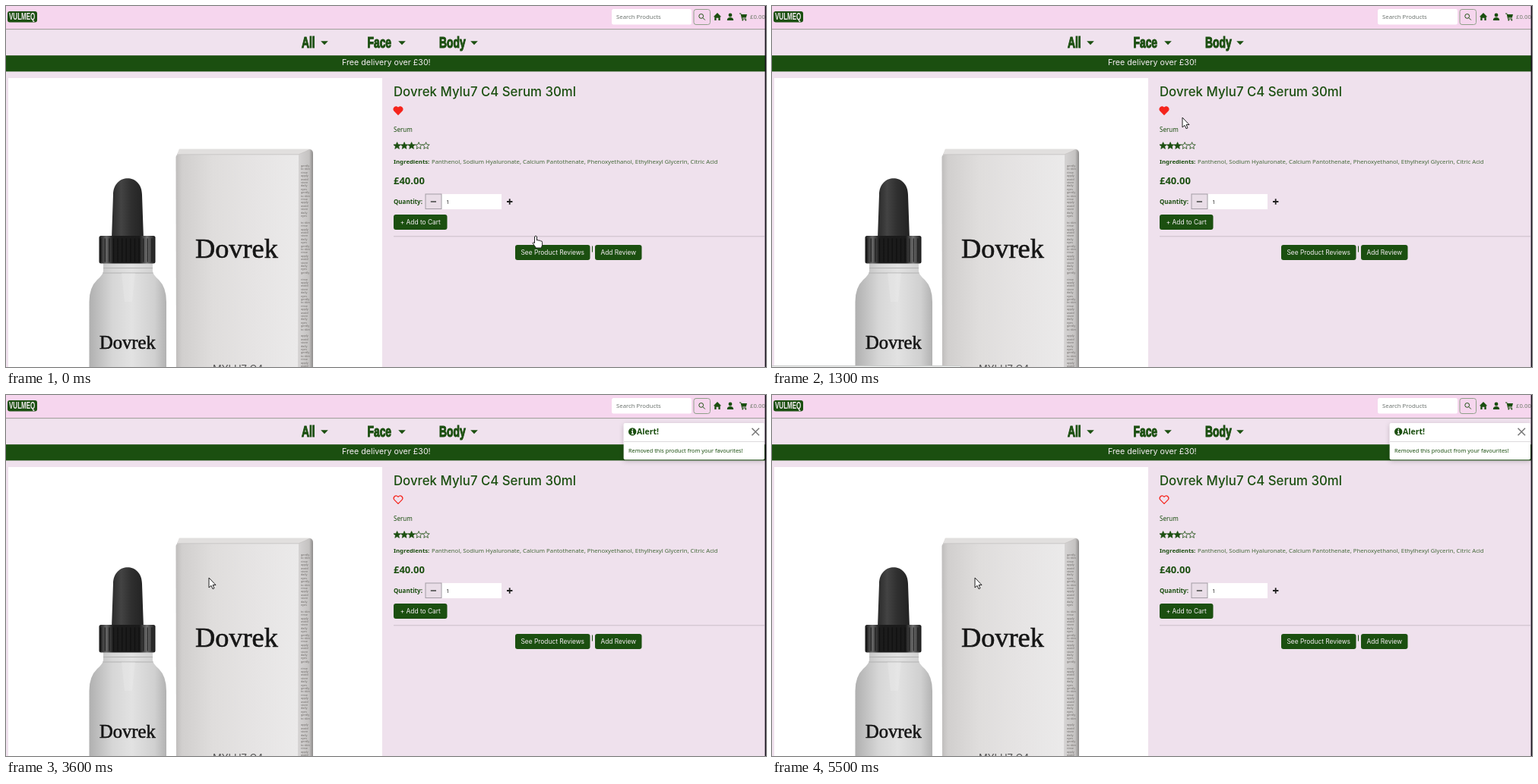
An HTML page for the animation above (5700 ms loop, 1000 px wide and 476 px high).

```html
<!DOCTYPE html>
<html lang="en">
<head>
<meta charset="utf-8">
<title>Product page</title>
<style>
  html, body { margin: 0; height: 100%; overflow: hidden; background: #efe1ed; }
  svg { display: block; width: 100vw; height: 100vh; }
  text { font: 7.75px "Noto Sans", sans-serif; fill: #1b4f10; }
  .ui { font-family: Inter, sans-serif; font-size: 8.4px; }
  .b { font-weight: 700; }
  .light { fill: #f6eef4; }
  .nav { font: 700 21px "Liberation Sans", Arial, sans-serif; stroke: #1b4f10; stroke-width: 1.2; }
  .mark { font: 700 12px "Liberation Sans", Arial, sans-serif; }
  .label { font-family: "Liberation Serif", serif; fill: #161616; stroke: #161616; stroke-width: .6; }
  .tiny { font-size: 3.8px; fill: #6f6b68; }
  .g { fill: #1b4f10; }
</style>
</head>
<body>
<svg viewBox="0 0 1000 476" preserveAspectRatio="none">
  <defs>
    <linearGradient id="front">
      <stop offset="0" stop-color="#bfbdbc"/><stop offset=".05" stop-color="#d1cfce"/>
      <stop offset=".3" stop-color="#dfdddc"/><stop offset=".65" stop-color="#e6e4e4"/>
      <stop offset="1" stop-color="#ebeaea"/>
    </linearGradient>
    <linearGradient id="side">
      <stop offset="0" stop-color="#d6d4d4"/><stop offset=".75" stop-color="#c4c2c1"/>
      <stop offset=".92" stop-color="#9d9b9a"/><stop offset="1" stop-color="#8e8c8b"/>
    </linearGradient>
    <linearGradient id="glass">
      <stop offset="0" stop-color="#b0b0b0"/><stop offset=".12" stop-color="#bfbfbf"/>
      <stop offset=".3" stop-color="#d6d6d6"/><stop offset=".55" stop-color="#e2e2e2"/>
      <stop offset=".85" stop-color="#d0d0d0"/><stop offset="1" stop-color="#b2b2b2"/>
    </linearGradient>
    <linearGradient id="rubber">
      <stop offset="0" stop-color="#2a2a2a"/><stop offset=".3" stop-color="#434343"/>
      <stop offset=".6" stop-color="#303030"/><stop offset="1" stop-color="#222"/>
    </linearGradient>
    <linearGradient id="cap">
      <stop offset="0" stop-color="#181818"/><stop offset=".13" stop-color="#666"/>
      <stop offset=".25" stop-color="#1c1c1c"/><stop offset=".72" stop-color="#1a1a1a"/>
      <stop offset=".85" stop-color="#707070"/><stop offset="1" stop-color="#161616"/>
    </linearGradient>
    <filter id="shadow" x="-10%" y="-20%" width="120%" height="150%">
      <feDropShadow dx="0" dy="2" stdDeviation="3" flood-opacity=".22"/>
    </filter>
    <path id="star" d="M0-4.6 1.3-1.5 4.6-1.3 2 .9 2.8 4.1 0 2.4-2.8 4.1-2 .9-4.6-1.3-1.3-1.5Z"/>
  </defs>

  <!-- Header -->
  <rect width="1000" height="30.3" fill="#f6d6ee"/>
  <rect y="30.3" width="1000" height="1" fill="#87897f"/>
  <rect y="31.3" width="1000" height="34" fill="#f0e2ee"/>
  <rect class="g" x="2" y="7" width="39" height="14.5" rx="3"/>
  <text class="mark light" transform="translate(4 18.4) scale(.67 1)">VULMEQ</text>
  <rect x="797" y="4" width="105" height="20.5" rx="2.5" fill="#fff"/>
  <text x="803" y="17.3" style="fill:#6d7470">Search Products</text>
  <rect x="905" y="4.5" width="21.5" height="20" rx="3" fill="none" stroke="#8fa089"/>
  <g fill="none" stroke="#1b4f10">
    <circle cx="914.7" cy="13.4" r="2.9"/><path d="M917 15.7 919.8 18.5"/>
  </g>
  <g class="g">
    <path d="M936 9 941.2 14.2H939.7V19H937.4V15.7H934.6V19H932.3V14.2H930.8Z"/>
    <circle cx="953" cy="12" r="2.4"/><path d="M948.8 19Q948.8 15 953 15T957.2 19Z"/>
    <path d="M965 9.6H967.2L967.6 11H975L973.8 15.6H968.8L969 16.5H974V17.4H968.2L966.6 10.6H965Z"/>
    <circle cx="969.3" cy="18.5" r="1"/><circle cx="973.3" cy="18.5" r="1"/>
  </g>
  <text x="979" y="17.3" style="fill:#6d7a68">£0.00</text>

  <!-- Menu and banner -->
  <g id="menu"></g>
  <rect class="g" y="65.2" width="1000" height="21.2"/>
  <text class="ui light" x="442" y="77.6" style="font-size:10.7px">Free delivery over £30!</text>

  <!-- Product picture -->
  <rect x="3" y="95" width="492" height="381" fill="#fff"/>
  <path d="M224 198 228 189H401Q404 190 404 194V476H224Z" fill="#d8d6d5"/>
  <path d="M228 188.5H401L385 196.5H225Z" fill="#e1dfde"/>
  <path d="M385 196.5 399 189Q404 189.5 404 195V476H384Z" fill="url(#side)"/>
  <path d="M223.5 199Q224 196 228 196H385L384 476H224Z" fill="url(#front)"/>
  <path d="M225 195.8H385L400 189.5" fill="none" stroke="#c4c2c1" stroke-width=".8"/>
  <g id="print"></g>
  <text class="label" x="249" y="332" style="font-size:36.3px">Dovrek</text>
  <text x="272" y="483" style="font:13px Inter,sans-serif;fill:#555">MYLU7 C4</text>

  <path d="M128 339H193V350Q194 355 201 361Q211 371 211 390V476H109.5V390Q109.5 371 120 361Q127 355 128 350Z" fill="url(#glass)"/>
  <path d="M128 345.5H193M127.5 352H193.5" stroke="#b2b2b2" fill="none"/>
  <path d="M152 352H170L166 390H156Z" fill="#eee" opacity=".3"/>
  <path d="M139 307 141 249C141 220 179 220 179 249L181 307Z" fill="url(#rubber)"/>
  <rect x="122.5" y="303" width="74" height="36.5" rx="2.5" fill="url(#cap)"/>
  <path d="M124 322H196" stroke="#0b0b0b" stroke-width="31" stroke-dasharray="1.4 4.2" opacity=".6"/>
  <text class="label" x="123" y="452" style="font-size:24.6px">Dovrek</text>

  <!-- Details -->
  <text class="ui" x="510" y="119.4" style="font-size:16.8px;font-weight:500">Dovrek Mylu7 C4 Serum 30ml</text>
  <path id="heart" stroke="#f5241c" stroke-width="1.2" stroke-linejoin="round"
        d="M516 143.3 510.9 138.2C508.6 135.6 512.4 130.2 516 134.3C519.6 130.2 523.4 135.6 521.1 138.2Z"/>
  <text x="510" y="165.6" style="font-size:8.1px">Serum</text>
  <g id="stars" stroke="#1b4f10" stroke-width=".8"></g>
  <text class="b" x="510" y="208.3">Ingredients:</text>
  <text x="560" y="208.3" style="fill:#456a3b">Panthenol, Sodium Hyaluronate, Calcium Pantothenate, Phenoxyethanol, Ethylhexyl Glycerin, Citric Acid</text>
  <text class="b" x="510" y="234.8" style="font-size:13px">£40.00</text>
  <text class="b" x="510" y="261.3" style="font-size:8px">Quantity:</text>
  <rect x="573" y="248" width="79" height="20" fill="#fff"/>
  <rect x="552" y="248" width="21" height="19.5" fill="#e9dde7" stroke="#a39da5"/>
  <path d="M558.8 258H566" stroke="#555" stroke-width="1.7"/>
  <path d="M659 258H666.4M662.7 254.3V261.7" stroke="#222" stroke-width="1.8"/>
  <text x="579" y="261" style="fill:#333">1</text>
  <rect x="510" y="303.3" width="488" height="1" fill="#cbbec9"/>
  <g id="buttons"></g>
  <path d="M771.5 316.5V324.5" stroke="#1b4f10"/>

  <!-- Alert -->
  <g id="toast">
    <rect x="812.7" y="37" width="185.3" height="48.2" rx="2" fill="#fff" filter="url(#shadow)"/>
    <path d="M813 61.5H998" stroke="#dddadd"/>
    <circle class="g" cx="824.2" cy="48.4" r="5.2"/>
    <path d="M824.4 44.8V46.4M823 48H824.4V51.4M822.8 51.4H826" stroke="#fff" stroke-width="1.3" fill="none"/>
    <text class="b" x="830" y="52.3" style="font-size:10.5px">Alert!</text>
    <path d="M981.5 43.8 991 53.3M991 43.8 981.5 53.3" stroke="#777" stroke-width="1.5"/>
    <text x="819" y="76.3" style="font-size:7.35px;font-weight:500">Removed this product from your favourites!</text>
  </g>

  <rect id="status" x="-1" width="250" height="14" rx="2" fill="#eef0ef" stroke="#c9cbca"/>
  <rect x="998.6" width="1.4" height="476" fill="#15101a"/>

  <g id="pointer" fill="#fff" stroke="#222" stroke-linejoin="round">
    <path id="arrow" d="M0 0V13L3 10.3 5 14.7 7 13.8 5.1 9.5H9Z"/>
    <path id="hand" d="M-1.5 1Q0-1 1.5 1V6Q3 4.8 4 6.4Q5.6 5.2 6.4 7Q8.6 6.4 8.6 8.6V12Q8 14 7.4 16H.4Q-2 12.5-4 9.6Q-3.4 7.6-1.5 9.6Z"/>
  </g>
</svg>
<script>
const LOOP = 5700, STEP = 100;
const $ = id => document.getElementById(id);

$('menu').innerHTML = [['All', 389, 419], ['Face', 475.5, 521], ['Body', 570, 616]].map(([name, x, caret]) =>
  `<text class="nav" transform="translate(${x} 55) scale(.66 1)">${name}</text>
   <path class="g" d="M${caret - 4.8} 46.2h9.6l-4.8 5Z"/>`).join('');

$('stars').innerHTML = [0, 1, 2, 3, 4].map(i =>
  `<use href="#star" x="${514.6 + i * 9.5}" y="184.2" fill="${i < 3 ? '#1b4f10' : 'none'}"/>`).join('');

$('buttons').innerHTML = [
  ['+ Add to Cart', 510, 275, 70.5], ['See Product Reviews', 670, 315, 98.5], ['Add Review', 775, 315, 61.5]
].map(([name, x, y, w]) =>
  `<rect class="g" x="${x}" y="${y}" width="${w}" height="20" rx="3"/>
   <text class="ui light" x="${x + w / 2}" y="${y + 13.2}" text-anchor="middle">${name}</text>`).join('');

// Small print running down the narrow side of the carton
const words = ['gently', 'apply', 'daily', 'to skin', 'avoid', 'eyes', 'rinse', 'store'];
for (let y = 212, i = 0; y < 476; y += 4.4, i++) {
  if (i % 17 === 16) continue;
  $('print').innerHTML += `<text class="tiny" x="388" y="${y}">${words[i * 3 % words.length]}</text>`;
}

// Pointer tip: time, x, y
const path = [
  [0, 697, 303], [100, 697, 303], [600, 528, 141], [1100, 528, 141],
  [1300, 540, 147], [1700, 555, 156], [3000, 555, 156], [3400, 267, 241], [LOOP, 267, 241]
];

function tipAt(t) {
  const i = path.findIndex(p => p[0] > t);
  const [t0, x0, y0] = path[i - 1], [t1, x1, y1] = path[i];
  const u = (t - t0) / (t1 - t0), k = u * u * (3 - 2 * u);
  return [x0 + (x1 - x0) * k, y0 + (y1 - y0) * k];
}

const show = (id, on) => $(id).setAttribute('visibility', on ? 'visible' : 'hidden');

function draw(t) {
  const pointing = t < 200 || (t >= 500 && t < 1200);
  const removed = t >= 2700;
  $('pointer').setAttribute('transform', `translate(${tipAt(t)})`);
  show('hand', pointing);
  show('arrow', !pointing);
  show('toast', removed);
  $('heart').setAttribute('fill', removed ? 'none' : '#f5241c');
  show('status', t >= 700 && t < 1400);
  $('status').setAttribute('y', t < 1200 ? 463 : t < 1300 ? 468.5 : 474.5);
}

const start = performance.now();
function tick() {
  const t = (performance.now() - start) % LOOP;
  draw(Math.min(Math.floor(t / STEP) * STEP, LOOP - 2 * STEP));
  requestAnimationFrame(tick);
}
tick();
</script>
</body>
</html>
```
